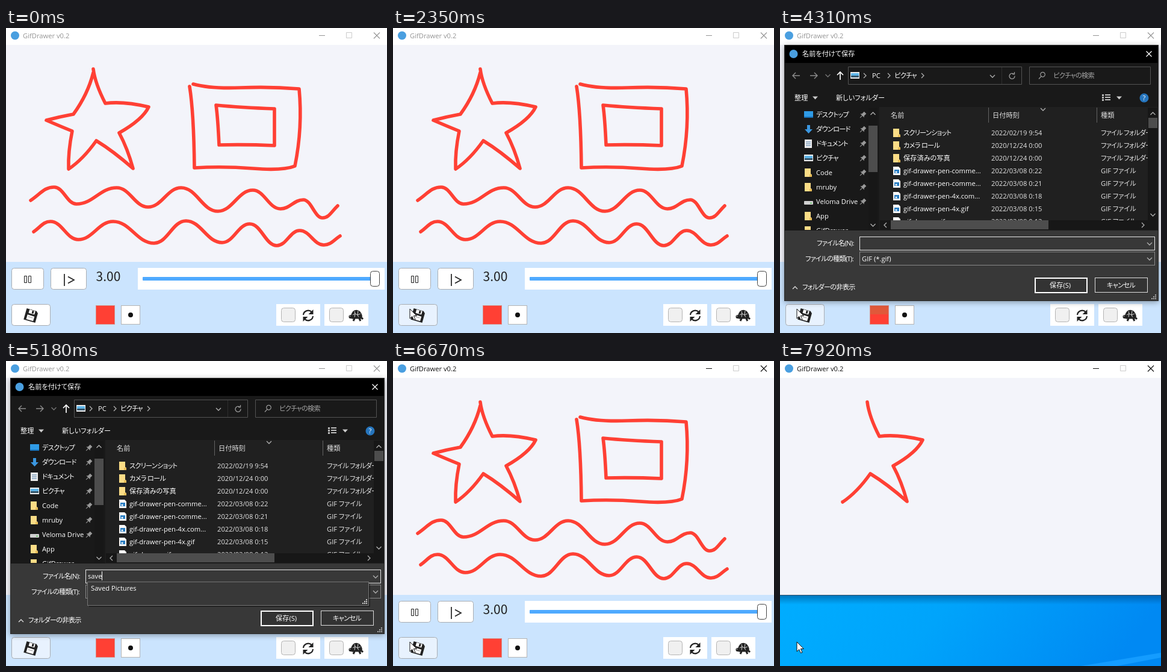
An HTML page that plays this animation: 633x506 px, repeating every 8000 ms.

```html
<!DOCTYPE html>
<html lang="ja">
<head>
<meta charset="utf-8">
<title>GifDrawer v0.2</title>
<style>
  html, body { margin: 0; width: 100%; height: 100%; overflow: hidden; background: #f3f4fa; }
  svg { display: block; width: 633px; height: 506px; }
  text {
    font: 11.2px "Open Sans", "Noto Sans CJK JP", "Noto Sans CJK", sans-serif;
    font-feature-settings: "palt";
    white-space: pre;
  }
  .kana { letter-spacing: -.7px; }
  .time { font: 21px "Noto Sans CJK JP", "Noto Sans CJK", sans-serif; }
  .ink { fill: none; stroke: #ff4034; stroke-width: 5.6; stroke-linecap: round; stroke-linejoin: round; }
  .line { fill: none; stroke: currentColor; }
  #dialog { transform-origin: 318px 240px; filter: drop-shadow(0 2px 5px rgba(0,0,0,.35)); }
</style>
</head>
<body>
<svg id="stage" viewBox="0 0 633 506"></svg>
<script>
const LOOP = 8000, TICK = 79;
const OPEN = 2590, CLOSE = 6430, REPLAY = 6750;
const STAR = ['M145 68', 'Q148 92 165 125', 'Q195 121 237 131', 'Q227 152 188 174', 'Q202 200 211 233',
  'Q178 204 150 187', 'Q128 218 104 234', 'Q103 205 110 171', 'Q90 163 67 153', 'Q90 147 112 143', 'Q136 110 145 74'];
const CORNER_TIMES = [REPLAY, 6900, 7060, 7290, 7530, 7690, 7920];
const KEY_TIMES = [4390, 4630, 5020, 5180];
const WORD = 'save';
const MATCHES = ['Saved Pictures', 'sample.gif', 'screen.gif', 'sketch.gif', 'star.gif'];

const rect = (x, y, w, h, fill, extra = '') =>
  `<rect x="${x}" y="${y}" width="${w}" height="${h}" fill="${fill}" ${extra}/>`;
const path = (d, color, width = 1) => `<path d="${d}" class="line" color="${color}" stroke-width="${width}"/>`;
const shape = (d, fill) => `<path d="${d}" fill="${fill}"/>`;
const ink = d => `<path class="ink" d="${d}"/>`;
const dot = (x, y, r, fill) => `<circle cx="${x}" cy="${y}" r="${r}" fill="${fill}"/>`;
const group = (id, body) => `<g id="${id}">${body}</g>`;
const repeat = (n, fn) => Array.from({ length: n }, (_, i) => fn(i)).join('');
const label = (x, y, s, fill = '#fff', extra = '') => {
  const kana = /^[\u30a0-\u30ff]/.test(s) ? 'class="kana"' : '';
  return `<text x="${x}" y="${y}" fill="${fill}" ${kana} ${extra}>${s}</text>`;
};
const chevron = (x, y, turn, color = '#b0b0b0') =>
  `<g transform="translate(${x} ${y}) rotate(${turn})">${path('M-4-2l4 4 4-4', color, 1.3)}</g>`;

// Wavy line through its crests and troughs, flat at each of them
function wave(points) {
  const last = points.length - 1;
  return points.slice(1).reduce((d, [x, y], i) => {
    const [px, py] = points[i], reach = .42 * (x - px), mid = (y + py) / 2;
    return d + `C${px + reach} ${i ? py : mid} ${x - reach} ${i + 1 < last ? y : mid} ${x} ${y}`;
  }, `M${points[0]}`);
}

function titleBar() {
  return rect(0, 0, 633, 28, '#fff') + dot(15, 12.5, 7, '#4a9fe0') +
    group('caption', label(28, 17, 'GifDrawer v0.2', 'currentColor') +
      path('M520 12.5h10M611 7.5l10 10M621 7.5l-10 10', 'currentColor', 1.1)) +
    path('M565.5 7.5h9v9h-9z', '#ccc');
}

function drawing() {
  const upper = wave([[41, 286], [80, 264], [117, 292], [184, 265], [236, 297], [291, 265],
    [352, 304], [410, 269], [456, 300], [494, 285], [526, 315], [551, 295]]);
  const lower = wave([[46, 338], [74, 321], [120, 351], [178, 321], [246, 357], [299, 320],
    [359, 356], [405, 325], [450, 361], [488, 336], [528, 360], [555, 345]]);
  const outer = 'M305 97Q312 140 313 232Q360 229 410 233T480 229Q493 165 487 101Q440 97 390 99T311 93';
  const inner = 'M349 128Q352 150 354 194Q400 193 446 195V134Q390 132 349 128';
  return [outer, inner, upper, lower].map(ink).join('');
}

const floppy = () => `<g transform="translate(41.500 477) rotate(16)">
  ${shape('M-10-9.500H7L10-6.500V9.500H-10z', '#222')}${rect(-5, -9, 10, 6, '#fff')}${rect(0, -8.5, 3, 4.5, '#222')}
  ${rect(-6, 0, 12, 8, '#fff')}${path('M-4 3h8', '#999')}</g>`;

function turtle() {
  return shape('M573 479C574 464 590 464 592 479L587 482H577z', '#222') +
    path('M576 476l4-2 4 2 5-2M579 470l1 4M585 469l-1 7M580 474l-1 6M584 476l2 4', '#fff', .8) +
    dot(572.5, 479, 3, '#222') + dot(571.5, 478, .7, '#fff') +
    path('M574 481h17l2 2M579 482l-2 4M587 482l2 4', '#222', 3);
}

function controls() {
  const button = (x, y, w, extra = '') =>
    rect(x + .5, y + .5, w, 35, '#fff', `rx="4" stroke="#a9adb2" ${extra}`);
  const check = x => rect(x, 458, 73, 36, '#fff') +
    rect(x + 8.5, 464.5, 23, 23, '#f0f0f0', 'rx="4" stroke="#b4b4b4"');
  const halfLoop = path('M-8-1A8 8 0 0 1 6-5.500', '#222', 2.2) + shape('M8.500-10v8h-8z', '#222');
  const arrows = `<g transform="translate(502 477)">${halfLoop}<g transform="rotate(180)">${halfLoop}</g></g>`;
  return rect(0, 388, 633, 118, '#cbe4fe') +
    button(9, 398, 53) + path('M30.5 411.5h4v11h-4zM37.5 411.5h4v11h-4z', '#222') +
    button(74, 398, 59) + path('M97 408v20M103 412.5l10 5.5-10 5.5', '#222', 1.7) +
    `<text class="time" x="149.5" y="420" fill="#222">3.00</text>` +
    rect(219, 398, 410, 36, '#fff') + rect(227, 413, 386, 6, '#4faaff', 'rx="1"') +
    rect(605.5, 403.5, 15, 25, '#fff', 'rx="4" stroke="#444"') +
    button(9, 458, 64, 'id="save"') + floppy() +
    rect(149.5, 460.5, 31, 31, '#ff4034', 'stroke="#d98a84"') + rect(150, 461, 30, 14, '#e0583a', 'id="shade"') +
    rect(191.5, 460.5, 31, 31, '#fff', 'stroke="#b4b4b4"') + dot(207, 476, 4, '#111') +
    check(449) + arrows + check(529) + turtle();
}

function desktop() {
  return rect(0, 388, 633, 118, 'url(#sky)') + shape('M500 506L633 484V492L560 506z', '#149cff') +
    rect(0, 388, 633, 16, 'url(#shadow)') + rect(0, 388, 633, 1, '#33506a');
}

const ICONS = {
  desk: rect(0, -6, 15, 11, '#2f9be6') + rect(0, 3, 15, 2, '#1670b8'),
  down: shape('M5-7h5v7h4l-6.500 7-6.500-7h4z', '#3b97e0'),
  doc: rect(1, -7, 12, 14, '#eee') + path('M3-3h8m-8 3h8m-8 3h8', '#4a7ba8'),
  pic: rect(0, -6, 15, 11, '#eee') + rect(1, -4, 13, 7, '#5db4e8') + rect(1, 0, 13, 3, '#35566b'),
  drive: rect(0, -1, 15, 6, '#d0d0d0', 'rx="1"') + rect(10, 2, 3, 1, '#2b2'),
  folder: shape('M1-7h10v9l2 1v4h-12z', '#fbdc86') + rect(9, 3, 4, 4, '#e8bd58'),
  gif: shape('M1-7h9l3 3v11h-12z', '#f8f8f8') + rect(3, -2, 8, 6, '#2b7fc4') + dot(6, 2, 1.5, '#fff'),
  pin: `<g transform="rotate(45)">${shape('M-2.500-5h5v5l2 2h-9l2-2z', '#999')}${path('M0 2v5', '#999')}</g>`
};
const icon = (kind, x, y) => `<g transform="translate(${x} ${y})">${ICONS[kind]}</g>`;

function fileLists() {
  const places = [['desk', 'デスクトップ'], ['down', 'ダウンロード'], ['doc', 'ドキュメント'], ['pic', 'ピクチャ'],
    ['folder', 'Code'], ['folder', 'mruby'], ['drive', 'Veloma Drive'], ['folder', 'App'], ['folder', 'GifDrawer']];
  const files = [['スクリーンショット', '2022/02/19 9:54'], ['カメラ ロール', '2020/12/24 0:00'],
    ['保存済みの写真', '2020/12/24 0:00'], ['gif-drawer-pen-comme...', '2022/03/08 0:22'],
    ['gif-drawer-pen-comme...', '2022/03/08 0:21'], ['gif-drawer-pen-4x.com...', '2022/03/08 0:18'],
    ['gif-drawer-pen-4x.gif', '2022/03/08 0:15'], ['gif-drawer.gif', '2022/03/08 0:13']];
  const side = places.map(([kind, name], i) => {
    const y = 144 + 24 * i;
    return icon(kind, 40, y) + label(60, y + 4, name) + (i < 7 ? icon('pin', 138, y) : '');
  }).join('');
  const rows = files.map(([name, date], i) => {
    const y = 174 + 21 * i, isDir = i < 3;
    return icon(isDir ? 'folder' : 'gif', 187, y) + label(205, y + 4, name) +
      label(351, y + 4, date, '#e4e4e4') + label(533, y + 4, isDir ? 'ファイル フォルダー' : 'GIF ファイル', '#e4e4e4');
  }).join('');
  return rect(8, 131, 620, 205, '#202020') + rect(8, 131, 157, 205, '#191919') +
    `<g clip-path="url(#sideClip)">${side}</g><g clip-path="url(#rowClip)">${rows}</g>` +
    label(184, 149, '名前', '#dedede') + label(353, 149, '日付時刻', '#dedede') + label(533, 149, '種類', '#dedede') +
    path('M346.5 132v25M526.5 132v25', '#636363') + chevron(437, 135, 0) +
    rect(147, 133, 15, 202, '#171717') + rect(147, 162, 15, 77, '#4d4d4d') +
    rect(611, 132, 16, 187, '#171717') + rect(612, 149, 15, 17, '#4d4d4d') +
    rect(166, 319, 461, 16, '#171717') + rect(184, 319, 262, 15, '#4d4d4d') +
    chevron(154.5, 142, 180) + chevron(154.5, 327, 0) + chevron(619.5, 142, 180) + chevron(619.5, 310, 0) +
    chevron(175, 327, 90) + chevron(603, 327, -90);
}

// Triangle of dots in a resizable corner
const grip = (x, y, color) => repeat(3, row => repeat(row + 1, i =>
  rect(x + 6 - 3 * i, y + 3 * row, 2, 2, color)));

function toolBars() {
  return rect(8, 58, 620, 73, '#191919') +
    path('M33 79h-12m5-5l-5 5 5 5M50 79h12m-5-5l5 5-5 5', '#8d8d8d', 1.4) +
    chevron(79.5, 79, 0, '#777') + path('M100 86v-13m-5 5l5-5 5 5', '#fff', 1.7) +
    path('M113.5 64.5h288v29h-288zM414.5 64.5h201v29h-201z', '#535353') + path('M368.5 65v28', '#2f2f2f') +
    icon('pic', 117, 79) + [141, 181, 237].map(x => chevron(x, 79, -90)).join('') +
    label(153, 83, 'PC') + label(190, 83, 'ピクチャ') + chevron(353, 80, 0) +
    path('M388.5 76.5a4.500 4.500 0 1 0 1.500 3M389.500 73v3.500h-3.500', '#999', 1.3) +
    path('M434 80a3.800 3.800 0 1 1 5 0a3.800 3.800 0 0 1-5 0l-4 4.500', '#999', 1.2) +
    label(454, 83, 'ピクチャの検索', '#a5a5a5') +
    label(24, 120, '整理') + shape('M54 113.5h9l-4.500 5z', '#ccc') + label(93, 120, '新しいフォルダー') +
    repeat(3, i => rect(535, 110 + 4 * i, 3, 3, '#bbb') + rect(540, 110 + 4 * i, 9, 2, '#bbb')) +
    shape('M559 113.5h9l-4.500 5z', '#ccc') + dot(605, 116, 7.5, '#2675bd') + label(602.5, 120, '?');
}

function fields() {
  return rect(132.5, 346.5, 490, 22, '#383838', 'stroke="#e8e8e8"') +
    rect(132.5, 371.5, 490, 22, '#383838', 'stroke="#8a8a8a"') + label(136, 387, 'GIF (*.gif)') +
    chevron(614, 358, 0) + chevron(614, 383, 0) +
    rect(424, 415, 86, 24, '#333', 'stroke="#fff" stroke-width="2"') + label(448, 431, '保存(S)') +
    rect(523.5, 414.5, 87, 24, '#333', 'stroke="#ddd"') + label(543, 431, 'キャンセル') +
    chevron(25, 431, 180, '#ddd') + label(37, 434, 'フォルダーの非表示') + grip(617, 442, '#aaa') +
    `<text id="typed" x="136" y="361" fill="#fff"></text>` + rect(136, 349, 1, 15, '#fff', 'id="caret"');
}

// Parts of the dialog that are still unpainted while it opens
function blanks() {
  return rect(8, 60, 620, 42, '#fff') + repeat(2, i => rect(132, 346 + 25 * i, 491, 23, '#fff')) +
    rect(17, 420, 129, 21, '#fff') + repeat(2, i => rect(423 + 100 * i, 414, 88, 26, '#fff')) +
    rect(611, 437, 17, 16, '#fff') +
    rect(134.5, 348.5, 486, 18, 'none', 'stroke="#777"') + rect(605, 349, 15, 17, '#444') + chevron(613, 358, 0);
}

function dialog() {
  return rect(7, 28, 622, 425, '#383838') + rect(7, 28, 622, 30, '#000') +
    dot(22.5, 43, 7, '#4a9fe0') + label(37, 47, '名前を付けて保存') +
    path('M608.5 38.5l9 9M617.5 38.5l-9 9', '#fff', 1.3) + toolBars() + fileLists() +
    label(61, 361, 'ファイル名(N):') + label(42, 387, 'ファイルの種類(T):') +
    group('fields', fields()) + group('blanks', blanks()) +
    rect(7.5, 28.5, 621, 424, 'none', 'stroke="#2a2a2a"') + group('suggest', '');
}

function suggestions(prefix) {
  if (!prefix) return '';
  const names = MATCHES.filter(s => s.toLowerCase().startsWith(prefix.slice(0, 3)));
  const h = 16 + 24 * names.length;
  return rect(138, 369, 467, h - 1, 'rgba(0,0,0,.4)') +
    rect(135.5, 366.5, 467, h - 1, '#383838', 'stroke="#747474"') +
    names.map((s, i) => label(141, 381 + 24 * i, s)).join('') + grip(592, 355 + h, '#ccc');
}

const stage = document.getElementById('stage');
stage.innerHTML = `<defs>
  <linearGradient id="sky" x2="1" y2=".15"><stop stop-color="#00adff"/><stop offset=".45" stop-color="#00a4fb"/><stop offset="1" stop-color="#0089f3"/></linearGradient>
  <linearGradient id="shadow" x2="0" y2="1"><stop stop-color="#003a70" stop-opacity=".5"/><stop offset="1" stop-color="#003a70" stop-opacity="0"/></linearGradient>
  <clipPath id="sideClip"><rect x="8" y="132" width="139" height="203"/></clipPath>
  <clipPath id="rowClip"><rect x="166" y="132" width="445" height="187"/></clipPath></defs>` +
  rect(0, 0, 633, 506, '#f3f4fa') + titleBar() + group('drawing', drawing()) +
  '<path id="star" class="ink"/>' + group('controls', controls()) + group('desktop', desktop()) +
  group('dialog', dialog()) +
  `<path id="cursor" d="M0 0V16L3.800 12.500L6.500 18.500L9 17.400L6.400 11.500H11.300z" fill="#fff" stroke="#111"/>`;

const el = {};
stage.querySelectorAll('[id]').forEach(e => el[e.id] = e);
const show = (e, on) => e.style.display = on ? '' : 'none';
const within = (t, from, to) => t >= from && t < to;
// progress from 0 to 1 in n equal jumps, the first one at the start time
const jumps = (t, start, n) => Math.min(1, Math.max(0, Math.floor((t - start) / TICK) + 1) / n);

const cornerLengths = STAR.map((_, i) => {
  el.star.setAttribute('d', STAR.slice(0, i + 1).join(''));
  return el.star.getTotalLength();
});

// The pen advances by half a side at a time
function starLength(t) {
  if (t < REPLAY) return cornerLengths[STAR.length - 1];
  const next = CORNER_TIMES.findIndex(time => time > t);
  if (next < 0) return cornerLengths[CORNER_TIMES.length - 1];
  const [from, to] = [CORNER_TIMES[next - 1], CORNER_TIMES[next]];
  const part = t < (from + to) / 2 ? 0 : .5;
  return cornerLengths[next - 1] + part * (cornerLengths[next] - cornerLengths[next - 1]);
}

function renderCursor(t) {
  const left = (1 - jumps(t, 1410, 9)) ** 2;
  const x = 28 + 84 * left, y = 466 + 37 * left;
  show(el.cursor, t >= 1410 && !within(t, 5180, 6590));
  el.cursor.setAttribute('transform', `translate(${x} ${y})`);
  el.save.setAttribute('fill', x < 70 ? '#e8f2fe' : '#fff');
}

function renderDialog(t) {
  const alpha = t < CLOSE ? 1 - (1 - jumps(t, OPEN, 5)) ** 3 : 1 - jumps(t, CLOSE, 3) ** 2;
  show(el.dialog, alpha > 0);
  el.dialog.style.opacity = alpha;
  el.dialog.style.transform = `scale(${.96 + .04 * alpha})`;
  const loading = t < OPEN + 2 * TICK;
  show(el.blanks, loading);
  show(el.fields, !loading);

  const typedBy = time => WORD.slice(0, KEY_TIMES.filter(key => key <= time).length);
  const typed = typedBy(t), prefix = typedBy(t - TICK);
  const lastKey = KEY_TIMES[typed.length - 1] || 2680;
  el.typed.textContent = typed;
  show(el.caret, Math.floor((t - lastKey) / 540) % 2 === 0);
  if (!loading && alpha) el.caret.setAttribute('x', Math.round(136 + (typed && el.typed.getComputedTextLength())));
  if (el.suggest.dataset.prefix !== prefix) {
    el.suggest.dataset.prefix = prefix;
    el.suggest.innerHTML = suggestions(prefix);
  }
}

function render(t) {
  const replay = t >= REPLAY;
  show(el.drawing, !replay);
  show(el.controls, !replay);
  show(el.desktop, replay);
  const active = within(t, 2200, 2350) || t >= 6590;
  el.caption.setAttribute('color', active ? '#111' : '#959595');
  show(el.shade, within(t, 2900, 4470));

  const drawn = starLength(t);
  show(el.star, drawn > 0);
  el.star.style.strokeDasharray = `${drawn} 2000`;
  renderCursor(t);
  renderDialog(t);
}

const start = performance.now();
function tick() {
  render((performance.now() - start) % LOOP);
  requestAnimationFrame(tick);
}
tick();
</script>
</body>
</html>
```
